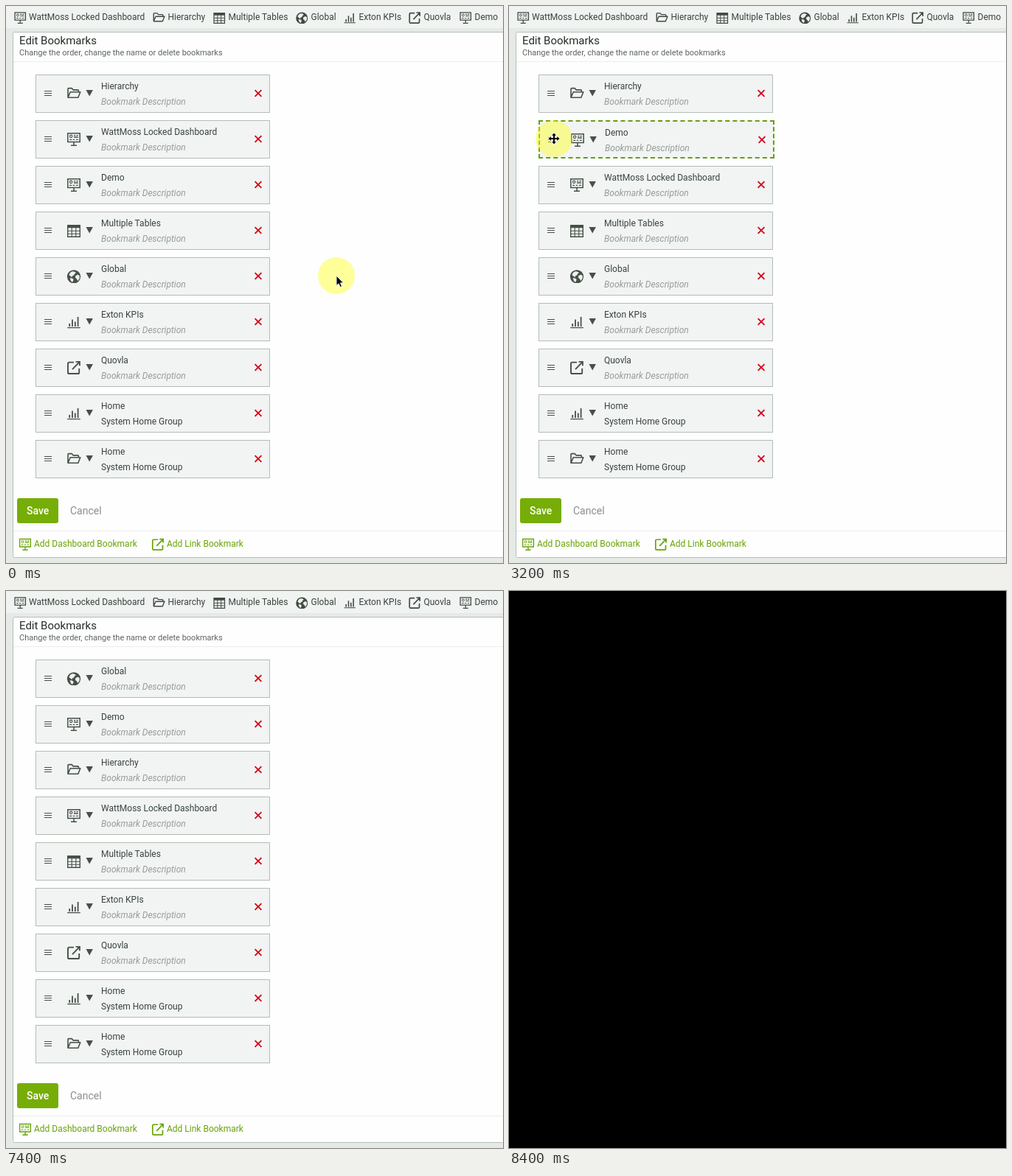
An HTML page that plays this animation: 674x756 px, repeating every 8600 ms.

```html
<!DOCTYPE html>
<html lang="en">
<head>
<meta charset="utf-8">
<title>Edit Bookmarks</title>
<style>
  html, body { margin: 0; width: 100%; height: 100%; overflow: hidden; background: #e6eae6; }
  #stage { position: relative; width: 674px; height: 756px; overflow: hidden; font-family: Roboto, Arial, sans-serif; }
  #stage > svg { position: absolute; left: 0; top: 0; }
  svg { display: block; overflow: visible; }
  text { font-size: 12px; fill: #39433b; white-space: pre; }
  .row { position: absolute; left: 40px; top: 0; width: 318px; height: 52px; box-sizing: border-box;
         border: 1px solid #b4bcb5; background: #f1f4f3; }
  .row.hot { width: 320px; border: 2px dashed #6a9c12; }
  .row .hint { font-style: italic; fill: #979c97; }
  #ghost { opacity: .5; }
  #pointer { pointer-events: none; }
  #fade { position: absolute; inset: 0; background: #000; opacity: 0; }
</style>
</head>
<body>
<div id="stage">
  <svg width="674" height="756">
    <defs>
      <symbol id="folder" viewBox="0 0 20 20">
        <path d="M2 16.2V4.6q0-1 1-1h4.2l2 2.3h6.2q1 0 1 1v1.8M2 16.2l3.2-7.4h13.6l-3 7.5H2.6z"
              fill="none" stroke="currentColor" stroke-width="1.6" stroke-linejoin="round"/>
      </symbol>
      <symbol id="monitor" viewBox="0 0 20 20">
        <g fill="none" stroke="currentColor">
          <path d="M1.8 2.8h16.4v11.6H1.8zM10 14.4v4M6 19.2h8" stroke-width="1.5"/>
          <circle cx="6.2" cy="6.8" r="1.7" stroke-width="1.1"/>
          <path d="M10 5.6h2.2M13.4 5.6h2.4M10 8h5.8M4.2 11.4h3M8.8 11.4h2.4M13 11.4h2.8" stroke-width="1.3"/>
        </g>
      </symbol>
      <symbol id="table" viewBox="0 0 20 20">
        <path d="M1.7 3.6h16.6v15.6H1.7z" fill="none" stroke="currentColor" stroke-width="1.4"/>
        <path d="M1.7 3.6h16.6v3.6H1.7z" fill="currentColor"/>
        <path d="M1.7 11.2h16.6M1.7 15.2h16.6M7.2 6v13M12.8 6v13" stroke="currentColor" stroke-width="1.1"/>
      </symbol>
      <symbol id="globe" viewBox="0 0 20 20">
        <circle cx="10" cy="11.3" r="9.1" fill="currentColor"/>
        <path d="M7.5 4.2l3 .2 2.6 1.6-2 1.4-1 2.2-2.4 1 .3 1.5-2-.8-2.6-2.3q1-3.6 4.1-4.8z
                 M12.4 10l3.3-1.4 2.2 1.8-.4 3.6-2.2 3-1.5-2.8-1.9-1.4zM4.6 13l3.6.8 1.5 1.6-1.6 3.6q-3-1.8-3.5-6z"
              fill="#eef2ef"/>
      </symbol>
      <symbol id="bars" viewBox="0 0 20 20">
        <path d="M1.2 18.6h17.6" stroke="currentColor" stroke-width="1.3"/>
        <path d="M4.2 17v-4M8 17V7.6M11.8 17v-6.4M15.6 17V4" stroke="currentColor" stroke-width="1.8"/>
      </symbol>
      <symbol id="link" viewBox="0 0 20 20">
        <path d="M10 3.6H3.6q-1.6 0-1.6 1.6v12.2q0 1.6 1.6 1.6h12q1.6 0 1.6-1.6V12M8 13.2L17.4 3.4M12.6 2.9h5.3v5.3"
              fill="none" stroke="currentColor" stroke-width="1.9"/>
      </symbol>
    </defs>
    <rect width="674" height="756" fill="#e6eae6"/>
    <rect width="674" height="30" fill="#f0f3f1"/>
    <rect x="9.5" y="35.5" width="680" height="713" rx="2" fill="#fdfefd" stroke="#b9beb9"/>
    <path d="M10 75.5h664M10 712.5h664" stroke="#eceeec"/>
    <g id="bar" color="#414b42"></g>
    <text x="18" y="52" style="font-size:15px;fill:#262c27">Edit Bookmarks</text>
    <text x="18" y="67" style="font-size:11px;fill:#5f655f">Change the order, change the name or delete bookmarks</text>
    <rect x="15" y="668" width="56" height="34" rx="3" fill="#76ad07"/>
    <text x="28" y="690" style="font-size:14px;font-weight:500;fill:#fff">Save</text>
    <text x="87" y="690" style="font-size:14px;fill:#8b8f8b">Cancel</text>
    <g color="#69a305">
      <use href="#monitor" x="17" y="721" width="18" height="18"/>
      <use href="#link" x="197" y="721" width="18" height="18"/>
      <text x="38" y="734" style="fill:#69a305">Add Dashboard Bookmark</text>
      <text x="218" y="734" style="fill:#69a305">Add Link Bookmark</text>
    </g>
  </svg>
  <div id="list"></div>
  <svg id="pointer" width="674" height="756">
    <g id="hand">
      <circle r="25" fill="#ff0" fill-opacity=".4"/>
      <path id="arrow" d="M0 0V13.6L3.1 10.8L5.2 15.6L7.6 14.6L5.5 9.9H9.7Z" fill="#000" stroke="#fff" stroke-width="1"/>
      <path id="cross" d="M0-7.5L3-4.2H1V-1H4.2V-3L7.5 0L4.2 3V1H1V4.2H3L0 7.5L-3 4.2H-1V1H-4.2V3L-7.5 0L-4.2-3V-1H-1V-4.2H-3Z"
            fill="#000" stroke="#fff" stroke-width="1.6" paint-order="stroke"/>
    </g>
  </svg>
  <div id="fade"></div>
</div>
<script>
  const LOOP = 8600, STEP = 200, TOP = 93, PITCH = 62;
  const $ = id => document.getElementById(id);

  const bar = [
    ['monitor', 11, 'WattMoss Locked Dashboard'], ['folder', 199, 'Hierarchy'],
    ['table', 281, 'Multiple Tables'], ['globe', 393, 'Global'], ['bars', 458, 'Exton KPIs'],
    ['link', 546, 'Quovla'], ['monitor', 615, 'Demo']
  ];
  $('bar').innerHTML = bar.map(([icon, x, label]) =>
    `<use href="#${icon}" x="${x - .5}" y="6.5" width="17.5" height="17.5"/>
     <text x="${x + (icon === 'monitor' && x < 600 ? 20 : 20.5)}" y="19">${label}</text>`).join('');

  const items = [
    ['folder', 'Hierarchy'], ['monitor', 'WattMoss Locked Dashboard'], ['monitor', 'Demo'],
    ['table', 'Multiple Tables'], ['globe', 'Global'], ['bars', 'Exton KPIs'], ['link', 'Quovla'],
    ['bars', 'Home', 'System Home Group'], ['folder', 'Home', 'System Home Group']
  ];

  const rowArt = ([icon, title, note]) => `
    <svg width="316" height="50" color="#465047">
      <path d="M11 21.5h10M11 24.5h10M11 27.5h10" stroke="currentColor" stroke-width="1.1"/>
      <use href="#${icon}" x="41" y="14" width="20" height="20"/>
      <path d="M67.5 20h9.4l-4.7 8.6z" fill="currentColor"/>
      <text x="88" y="19">${title}</text>
      <text x="88" y="40" class="${note ? '' : 'hint'}">${note || 'Bookmark Description'}</text>
      <path d="M296.6 20.1l8.8 8.8m0-8.8l-8.8 8.8" stroke="#d4061c" stroke-width="1.9"/>
    </svg>`;

  const addRow = html => {
    const el = document.createElement('div');
    el.className = 'row';
    el.innerHTML = html;
    $('list').append(el);
    return el;
  };
  const rows = items.map(item => addRow(rowArt(item)));
  const ghost = addRow('');
  ghost.id = 'ghost';
  ghost.classList.add('hot');

  // time, x, y
  const path = [
    [0, 448, 366], [2000, 447, 239], [2600, 61, 242], [2800, 61, 242], [3600, 61, 118],
    [4200, 61, 118], [4400, 61, 289], [4600, 61, 366], [4800, 61, 366], [5400, 61, 118],
    [5800, 61, 118], [6000, 61, 236], [6200, 61, 366], [6800, 45, 685], [7200, 45, 685]
  ];
  const drags = [{ item: 2, start: 2800, end: 3800 }, { item: 4, start: 4800, end: 5600 }];
  const HIDE = 7200, FADE = 7400, FADE_TIME = 1000;

  function cursorAt(t) {
    const i = path.findIndex(p => p[0] > t);
    if (i < 0) return path[path.length - 1].slice(1);
    const [t0, x0, y0] = path[i - 1], [t1, x1, y1] = path[i];
    const u = (t - t0) / (t1 - t0), e = u * u * (3 - 2 * u);
    return [x0 + (x1 - x0) * e, y0 + (y1 - y0) * e];
  }

  const slotAt = y => Math.max(0, Math.min(8, Math.round((y - TOP - 26) / PITCH)));
  const place = (el, y) => { el.style.transform = `translateY(${y}px)`; };

  function orderAt(t) {
    const order = items.map((_, i) => i);
    for (const d of drags) {
      if (t < d.start) break;
      const slot = slotAt(cursorAt(Math.min(t, d.end))[1]);
      order.splice(order.indexOf(d.item), 1);
      order.splice(slot, 0, d.item);
    }
    return order;
  }

  function hoverSlot(x, y) {
    const s = Math.floor((y - TOP) / PITCH);
    return x >= 40 && x <= 358 && s >= 0 && s < 9 && y - TOP - s * PITCH <= 52 ? s : -1;
  }

  function draw(t) {
    const [x, y] = cursorAt(t), order = orderAt(t), shown = t < HIDE;
    const drag = drags.find(d => t >= d.start && t < d.end);
    const hover = shown ? hoverSlot(x, y) : -1;

    order.forEach((id, slot) => {
      place(rows[id], TOP + slot * PITCH);
      rows[id].classList.toggle('hot', drag ? id === drag.item : slot === hover);
    });

    ghost.style.display = drag ? '' : 'none';
    if (drag) {
      const html = rows[drag.item].innerHTML;
      if (ghost.dataset.item !== String(drag.item)) {
        ghost.innerHTML = html;
        ghost.dataset.item = drag.item;
      }
      place(ghost, TOP + drag.item * PITCH + y - cursorAt(drag.start)[1]);
    }

    const moving = drag || hover >= 0;
    $('hand').style.display = shown ? '' : 'none';
    $('hand').setAttribute('transform', `translate(${x} ${y})`);
    $('arrow').style.display = moving ? 'none' : '';
    $('cross').style.display = moving ? '' : 'none';
    $('fade').style.opacity = Math.max(0, Math.min(1, (t - FADE) / FADE_TIME));
  }

  const began = performance.now();
  function tick() {
    const t = (performance.now() - began) % LOOP;
    draw(Math.floor(t / STEP) * STEP);
    requestAnimationFrame(tick);
  }
  tick();
</script>
</body>
</html>
```
